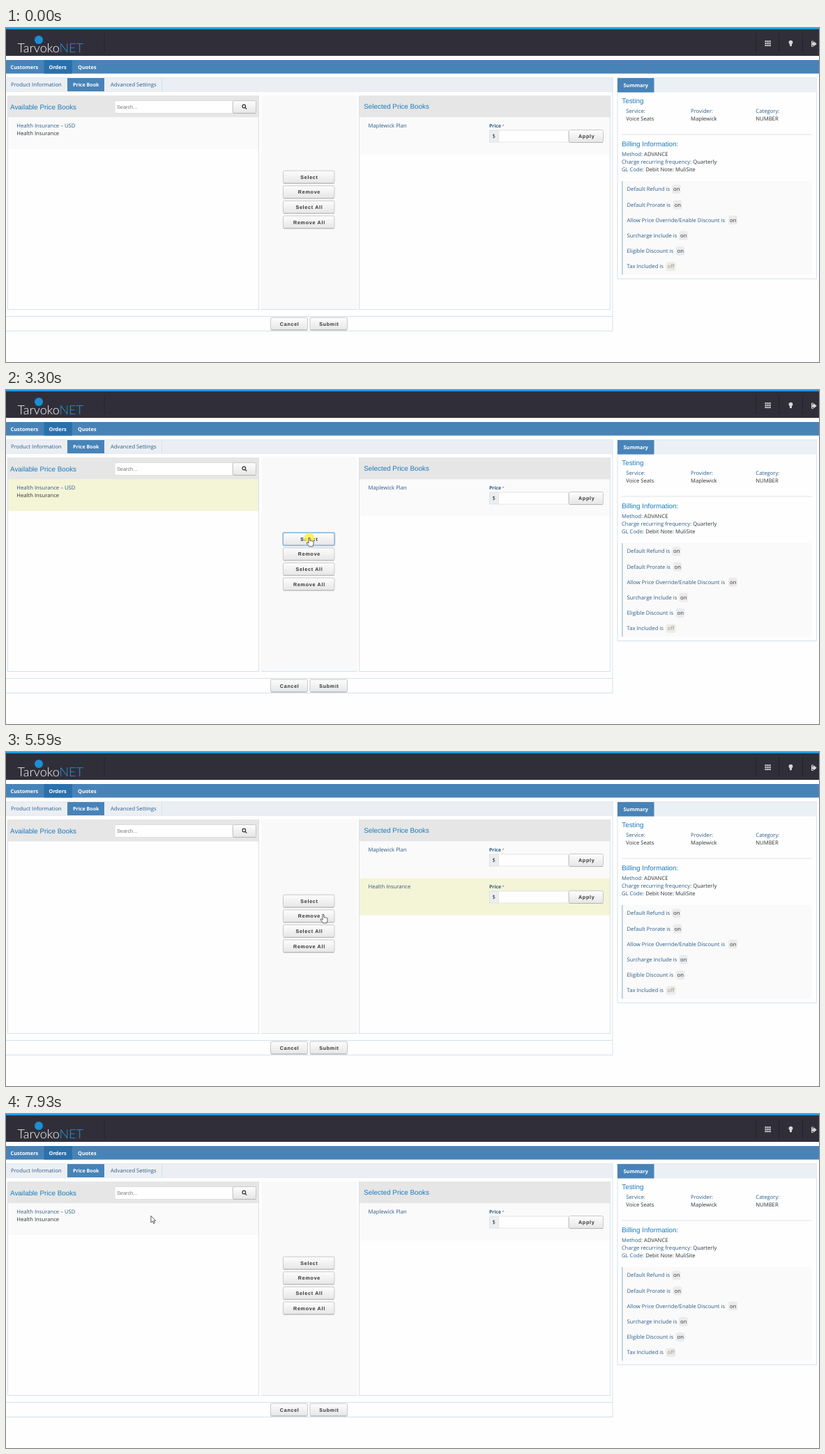
These frames come from a looping animation (1166x480 px, 8000 ms). An HTML page:

```html
<!DOCTYPE html>
<html lang="en">
<head>
<meta charset="utf-8">
<title>Price books</title>
<style>
  html, body { margin: 0; width: 100%; height: 100%; overflow: hidden; background: #fefefe; }
  svg { display: block; text-rendering: geometricPrecision; }
  text { font: 7.7px "Open Sans", "Noto Sans", sans-serif; fill: #2a5c88; white-space: pre; }
  .dark { fill: #2c3338; }
  .head { font: 9.85px "Liberation Sans", Arial, sans-serif; fill: #1a7bbd; }
  .nav { font-size: 7.4px; font-weight: 700; fill: #fff; }
  .tab { font-size: 7.1px; font-weight: 700; fill: #fff; }
  .price { font-size: 6.9px; font-weight: 700; }
  .btn { font: 700 7.2px "Liberation Sans", Arial, sans-serif; letter-spacing: .7px; fill: #333; text-anchor: middle; }
  .hint { font: 7.3px "Liberation Sans", Arial, sans-serif; fill: #757575; }
  .logo { font: 300 18px Lato, sans-serif; fill: #fff; }
  .off { fill: #a8896c; }
</style>
</head>
<body>
<svg id="stage" width="1166" height="480" viewBox="0 0 1166 480" xmlns="http://www.w3.org/2000/svg"></svg>
<script>
const BLUE = '#4883b8', LINE = '#d6e1eb', PALE = '#fafafa', GLOW = '#f4f4d7';

const rect = (x, y, w, h, fill, more = '') =>
  `<rect x="${x}" y="${y}" width="${w}" height="${h}" fill="${fill}" ${more}/>`;
const frame = (x, y, w, h, fill, stroke = LINE, rx = 0) =>
  rect(x + .5, y + .5, w - 1, h - 1, fill, `stroke="${stroke}" rx="${rx}"`);
const text = (x, y, s, cls = '') => `<text x="${x}" y="${y}" class="${cls}">${s}</text>`;
const group = (id, body) => `<g id="${id}">${body}</g>`;
const button = (x, y, w, label) =>
  frame(x, y, w, 19, 'url(#face)', '#c9c9c9', 2) +
  rect(x + 1, y + 18, w - 2, 1, '#b4b4b4') +
  text(x + w / 2 + .7, y + 12, label, 'btn');
const ring = (id, y) => group(id,
  rect(397, y, 74.5, 19, 'none', 'rx="2.5" stroke="#a9cdea" stroke-width="1.6"') +
  rect(397.5, y + .5, 73.5, 18, 'none', 'rx="2" stroke="#79aed8" stroke-width=".8"'));

function priceRow(y, name) {
  return text(519.5, y + 14.7, name) +
    text(693, y + 14.5, 'Price', 'price') +
    `<text x="711.5" y="${y + 14}" style="font-size:6px;fill:#a66a72">*</text>` +
    frame(693, y + 18, 14, 18, '#ebeef0', '#dfe3e6') +
    text(697.5, y + 29.5, '$', 'dark') +
    frame(706, y + 18, 101, 18, '#fefefe', '#e6e6e6') +
    button(807, y + 17.5, 50, 'Apply');
}

function header() {
  let grid = '';
  for (let i = 0; i < 9; i++)
    grid += rect(1088.5 + i % 3 * 3, 18 + Math.floor(i / 3) * 3, 2.2, 2.2, '#d4d4d8');
  return rect(0, 0, 1166, 40, '#302f39') + rect(0, 0, 1166, 2, '#1e96e0') +
    [140.5, 1075, 1108, 1142].map(x => rect(x, 7, 1, 28, '#25242d')).join('') +
    '<circle cx="47" cy="17" r="6" fill="#1b8fd6"/>' +
    text(16.5, 35, 'Tarvoko<tspan fill="#2a9be0">NET</tspan>', 'logo') + grid +
    '<g fill="#d4d4d8"><circle cx="1125.5" cy="20.6" r="2.9"/>' +
    '<path d="M1124 22h3v3.2l-1 1h-1l-1-1z"/>' +
    '<path d="M1158.5 20.5v-1.5l4.3 3.8-4.3 3.8V25h-2.3v-4.500z"/></g>' +
    '<path d="M1158 19h-2.500v7.500h2.500" fill="none" stroke="#d4d4d8"/>';
}

function navigation() {
  return rect(0, 46, 1166, 19.5, BLUE) + rect(54.5, 46, 40.5, 19.5, '#2a70ac') +
    text(6.5, 58.5, 'Customers', 'nav') + text(61.5, 58.5, 'Orders', 'nav') +
    text(103, 58.5, 'Quotes', 'nav') +
    rect(0, 71, 870, 20, '#ebeff4') + rect(0, 71, 870, 1, '#dfe8f0') +
    rect(0, 91, 870, 1, '#e4ebf2') + rect(88, 72, 53, 19, BLUE) +
    rect(223, 72, 1, 19, LINE) +
    text(7, 84.300, 'Product Information') + text(96, 84.300, 'Price Book', 'tab') +
    text(150, 84.300, 'Advanced Settings');
}

function panels() {
  return rect(869.5, 71, 1, 365, LINE) + rect(0, 414, 870, 1, LINE) + rect(0, 435, 870, 1, LINE) +
    frame(2, 97, 361, 308, '#fefefe') + rect(3, 97, 359, 31.5, '#e6e6e6') +
    text(6, 116.500, 'Available Price Books', 'head') +
    frame(155.5, 104, 170, 19, '#fff', '#e0e0e0') + text(159, 115.800, 'Search...', 'hint') +
    button(325, 104, 34, '') +
    '<g fill="none" stroke="#333" stroke-width="1.2"><circle cx="341.300" cy="112.500" r="2.300"/>' +
    '<path d="M343 114.300l2.200 2.200"/></g>' +
    rect(366, 97, 138, 308, '#f9f9f9') + rect(366, 404, 138, 1, LINE) +
    frame(506, 97, 361, 308, '#fefefe') + rect(507, 97, 359, 31.5, '#e6e6e6') +
    text(513.3, 115.8, 'Selected Price Books', 'head') +
    rect(507, 128.5, 359, 53, PALE) + priceRow(128.5, 'Maplewick Plan') +
    ['Select', 'Remove', 'Select All', 'Remove All']
      .map((s, i) => button(397, 204.7 + i * 21.6, 74.5, s)).join('') +
    button(379, 415.500, 54, 'Cancel') + button(435.500, 415.500, 54.500, 'Submit');
}

function summary() {
  const pair = (y, key, value) => text(883, y, `${key} <tspan class="dark">${value}</tspan>`);
  const field = (x, key, value) => text(x, 122.300, key) + text(x, 133.400, value, 'dark');
  const flags = [
    ['Default Refund is', 955], ['Default Prorate is', 956.5],
    ['Allow Price Override/Enable Discount is', 1036], ['Surcharge Include is', 965],
    ['Eligible Discount is', 960.5], ['Tax Included is', 946.5, 'off']
  ];
  return frame(876.5, 71, 286.5, 290, '#fefefe') + rect(877, 71.500, 285.500, 21, '#ebf0f5') +
    rect(877, 72, 52.500, 20.500, BLUE) + text(885.5, 85, 'Summary', 'nav') +
    text(883.3, 107.700, 'Testing', 'head') +
    field(889.3, 'Service:', 'Voice Seats') + field(982, 'Provider:', 'Maplewick') +
    field(1075.3, 'Category:', 'NUMBER') + rect(883, 152.500, 273, 1, '#e4e4e4') +
    text(883.3, 170, 'Billing Information:', 'head') +
    pair(184, 'Method:', 'ADVANCE') +
    pair(195, 'Charge recurring frequency:', 'Quarterly') +
    pair(206, 'GL Code:', 'Debit Note: MuliSite') +
    rect(883, 220, 273, 134.5, PALE) + rect(883, 220, 1.600, 134.5, '#b3cbe0') +
    flags.map(([label, x, state = 'on'], i) => {
      const y = 234.400 + i * 22.200;
      return text(890.5, y, label) + rect(x, y - 9.200, state === 'on' ? 13 : 14, 13, '#ececec', 'rx="3.5"') +
        text(x + 2, y, state, state === 'on' ? 'dark' : 'off');
    }).join('');
}

const stage = document.getElementById('stage');
stage.innerHTML = `<defs><linearGradient id="face" x2="0" y2="1">
  <stop stop-color="#fdfdfd"/><stop offset="1" stop-color="#e6e6e6"/></linearGradient></defs>` +
  header() + navigation() + panels() + summary() +
  group('leftRow', rect(3, 128.5, 359, 45.5, PALE, 'id="leftFill"') +
    text(15.3, 142.700, 'Health Insurance – USD') + text(15.3, 153.700, 'Health Insurance', 'dark')) +
  group('rightRow', rect(507, 181.5, 359, 53, PALE, 'id="rightFill"') + priceRow(181.5, 'Health Insurance')) +
  ring('selectRing', 204.7) + ring('removeRing', 226.3) +
  group('pointer', '<circle id="click" r="7.300" cy=".6" fill="#fff04a" fill-opacity=".85"/>' +
    '<g fill="#fff" stroke="#333" stroke-width=".8" stroke-linejoin="round">' +
    '<path id="arrow" d="M.4 .4V10l2.200-2 1.600 3.500 1.600-.7-1.600-3.400h3z"/>' +
    '<path id="hand" d="M-1 .8q1-1.200 2 0v4q1-.6 1.800.2 1-.5 1.800.3 1.400-.2 1.400 1v3.200l-1 3.300h-5.200L-3.600 8.500q-.5-1.700 1-1.500L-1 8.300z"/></g>');

const el = {};
for (const node of stage.querySelectorAll('[id]')) el[node.id] = node;

// start, end, number of steps, then [step, x, y] along the way
const moves = [
  [680, 1470, 11, [1, 1008, 363], [4, 640, 282], [8, 184, 196], [11, 175, 223]],
  [1550, 2270, 10, [4, 162, 166], [7, 158, 156.500]],
  [2580, 3060, 7, [2, 230, 172], [5, 408, 206], [7, 435, 212]],
  [3770, 4570, 11, [3, 488.5, 200.5], [6, 528, 182], [9, 564, 198], [10, 567.3, 201]],
  [5270, 5590, 5, [3, 492, 222], [5, 455, 233]],
  [6130, 6210, 2, [2, 455, 237]],
  [6520, 6760, 4, [2, 300, 178], [4, 207.500, 145]],
  [6990, 6990, 1, [1, 206.700, 144.500]],
  [7930, 7930, 1, [1, 207.500, 146]]
];
const clicks = [[2110, 2270], [3300, 3380], [4570, 4730], [5740, 5900], [7150, 7310], [7620, 7700]];

function pointerAt(t) {
  let last = null;
  for (const [start, end, steps, ...stops] of moves) {
    if (t < start) break;
    const gap = steps > 1 ? (end - start) / (steps - 1) : 1;
    const k = Math.min(steps, Math.floor((t - start) / gap + .01) + 1);
    let from = last ? [0, ...last] : stops[0];
    last = stops[stops.length - 1].slice(1);
    for (const to of stops) {
      if (k <= to[0]) {
        const f = (k - from[0]) / (to[0] - from[0] || 1);
        last = [from[1] + (to[1] - from[1]) * f, from[2] + (to[2] - from[2]) * f];
        break;
      }
      from = to;
    }
  }
  return last;
}

const within = (t, a, b) => t >= a && t < b;
const show = (node, on) => node.setAttribute('visibility', on ? 'inherit' : 'hidden');

function draw(t) {
  const moved = within(t, 3380, 5900);
  show(el.leftRow, !moved);
  show(el.rightRow, moved);
  el.leftFill.setAttribute('fill', within(t, 2270, 3380) || within(t, 7310, 7700) ? GLOW : PALE);
  el.rightFill.setAttribute('fill', t >= 4730 ? GLOW : PALE);
  show(el.selectRing, within(t, 3300, 4570));
  show(el.removeRing, within(t, 5740, 7150));

  const at = pointerAt(t);
  show(el.pointer, at);
  if (!at) {
    for (const part of [el.click, el.arrow, el.hand]) show(part, false);
    return;
  }
  const [x, y] = at;
  const onButton = within(x, 397, 472) && within(y, 205, 288);
  el.pointer.setAttribute('transform', `translate(${x} ${y})`);
  show(el.arrow, !onButton);
  show(el.hand, onButton);
  show(el.click, clicks.some(([a, b]) => within(t, a, b)));
}

const begin = performance.now();
function tick() {
  draw((performance.now() - begin) % 8000);
  requestAnimationFrame(tick);
}
tick();
</script>
</body>
</html>
```
